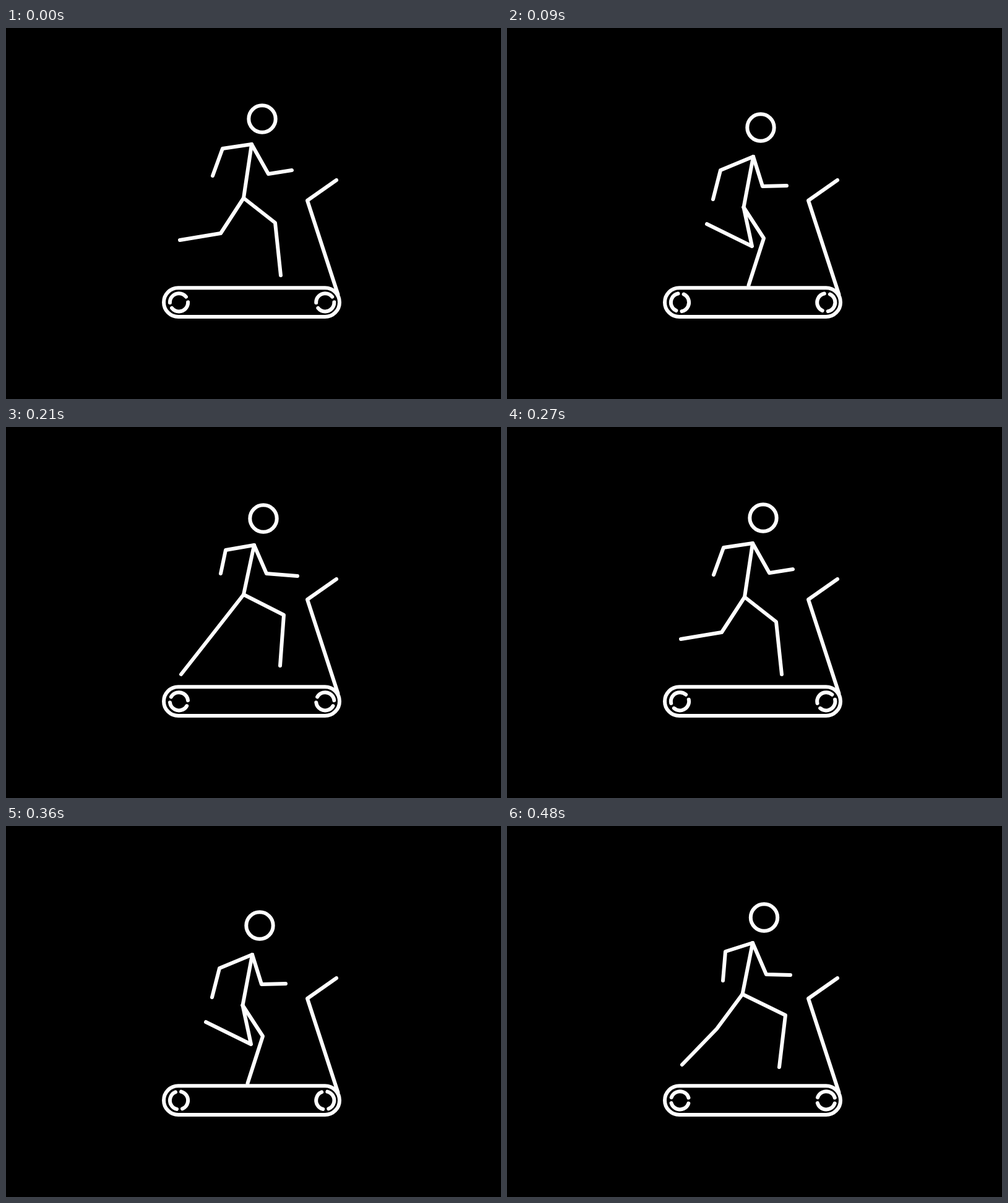
An HTML page with a canvas that plays this animation: 800 px wide and 600 px high, repeating every 0.51 s.

```html
<!DOCTYPE html>
<html lang="en">
<head>
<meta charset="utf-8">
<title>Treadmill runner</title>
<style>
  html, body { margin: 0; width: 100%; height: 100%; overflow: hidden; background: #000; }
  canvas { display: block; }
</style>
</head>
<body>
<canvas id="stage" width="800" height="600"></canvas>
<script>
const ctx = document.getElementById('stage').getContext('2d');
const LOOP = 510, STEP = 30, TAU = Math.PI * 2;

// head, neck, hip
const torso = {
  reach:  [414, 147, 397, 188, 384, 275],
  land:   [409.5, 152, 398, 200, 382, 291],
  stand:  [410, 161, 398, 208, 382.5, 290],
  pass:   [419, 163, 400, 205, 383, 290],
  push:   [416, 148, 401, 191, 384, 271],
  pass2:  [419, 161, 398.5, 203, 382, 285],
  push2:  [415.5, 148, 397, 189, 380.5, 272]
};
// elbow, hand of each arm; the first arm starts the stride at the back
const arms = {
  reach:  [350, 195, 334, 239, 424, 236, 462, 230],
  land:   [343, 209, 321, 242, 425, 243, 471, 223],
  stand:  [345, 230, 333, 277, 413, 256, 452, 255],
  pass:   [384, 260, 419, 278, 386, 261, 423, 287],
  push:   [421, 237, 471, 241, 355, 199, 347, 237],
  pass2:  [380, 238, 411, 273, 383, 261, 416, 286],
  push2:  [419, 240, 458, 241, 353, 203, 349, 250]
};
// knee, foot of each leg; the first leg starts the stride in front
const legs = {
  reach:  [435, 315, 444, 400, 347, 332, 281, 343],
  land:   [420, 340, 428, 417, 367, 350, 296, 299],
  stand:  [415, 340, 390.5, 416, 396, 353, 323, 317],
  pass:   [368, 349, 310, 411, 445, 310, 378, 366],
  push:   [334, 335, 283, 400, 449, 304, 443, 386],
  pass2:  [372, 348, 313, 405, 446, 308, 379, 362],
  push2:  [339, 328, 283, 386, 450, 306, 440, 390]
};
// time, pose, whether the limbs have changed sides
const cycle = [
  [0, 'reach', 0], [60, 'land', 0], [90, 'stand', 0], [150, 'pass', 0], [210, 'push', 0],
  [270, 'reach', 1], [330, 'land', 1], [360, 'stand', 1], [420, 'pass2', 1], [480, 'push2', 1]
];
const times = cycle.map(k => k[0]);
const count = cycle.length;

function limb(table, side, root) {
  const rows = cycle.map(([, pose, swap]) => {
    const at = side ^ swap ? 4 : 0;
    const [jx, jy, ex, ey] = table[pose].slice(at, at + 4);
    const dx = jx - torso[pose][root], dy = jy - torso[pose][root + 1];
    return [Math.hypot(dx, dy), Math.atan2(dy, dx),
            Math.hypot(ex - jx, ey - jy), Math.atan2(ey - jy, ex - jx)];
  });
  for (let i = 1; i < count; i++)
    for (const c of [1, 3])
      rows[i][c] -= TAU * Math.round((rows[i][c] - rows[i - 1][c]) / TAU);
  return { rows, root };
}

const body = cycle.map(k => torso[k[1]]);
const limbs = [limb(arms, 0, 2), limb(arms, 1, 2), limb(legs, 0, 4), limb(legs, 1, 4)];

// Smooth periodic interpolation through every key
function sample(rows, t) {
  let i = count - 1;
  while (times[i] > t) i--;
  const key = n => rows[(n + count) % count];
  const time = n => times[(n + count) % count] + LOOP * Math.floor(n / count);
  const h = time(i + 1) - time(i), u = (t - time(i)) / h;
  const u2 = u * u, u3 = u2 * u;
  return key(i).map((a, c) => {
    const b = key(i + 1)[c];
    const slope = n => (key(n + 1)[c] - key(n - 1)[c]) / (time(n + 1) - time(n - 1));
    return a + (b - a) * (3 * u2 - 2 * u3)
      + h * ((u3 - 2 * u2 + u) * slope(i) + (u3 - u2) * slope(i + 1));
  });
}

function line(...p) {
  ctx.beginPath();
  for (let i = 0; i < p.length; i += 2) ctx.lineTo(p[i], p[i + 1]);
  ctx.stroke();
}

function arc(x, y, r, from, to) {
  ctx.beginPath();
  ctx.arc(x, y, r, from, to);
  ctx.stroke();
}

function treadmill(t) {
  ctx.beginPath();
  ctx.roundRect(255, 420.3, 284, 46.8, 23.4);
  ctx.stroke();
  line(534, 246, 487, 279, 536.5, 431);
  const turn = -(20 / 360 + t / LOOP) * TAU, gap = 0.32;
  for (const x of [279.5, 515.8])
    for (const a of [turn, turn + Math.PI])
      arc(x, 443.8, 14.6, a + gap, a + Math.PI - gap);
}

function runner(t) {
  const b = sample(body, t);
  arc(b[0], b[1], 21.7, 0, TAU);
  line(b[2], b[3], b[4], b[5]);
  for (const { rows, root } of limbs) {
    const [r1, a1, r2, a2] = sample(rows, t);
    const x = b[root], y = b[root + 1];
    const jx = x + r1 * Math.cos(a1), jy = y + r1 * Math.sin(a1);
    line(x, y, jx, jy, jx + r2 * Math.cos(a2), Math.min(417, jy + r2 * Math.sin(a2)));
  }
}

function draw(now) {
  const t = Math.floor((now % LOOP) / STEP) * STEP;
  ctx.fillStyle = '#000';
  ctx.fillRect(0, 0, 800, 600);
  ctx.strokeStyle = '#fff';
  ctx.lineWidth = 6;
  ctx.lineCap = ctx.lineJoin = 'round';
  treadmill(t);
  runner(t);
}

let start;
function tick(now) {
  start ??= now;
  draw(Math.max(0, now - start));
  requestAnimationFrame(tick);
}
draw(0);
requestAnimationFrame(tick);
</script>
</body>
</html>
```
